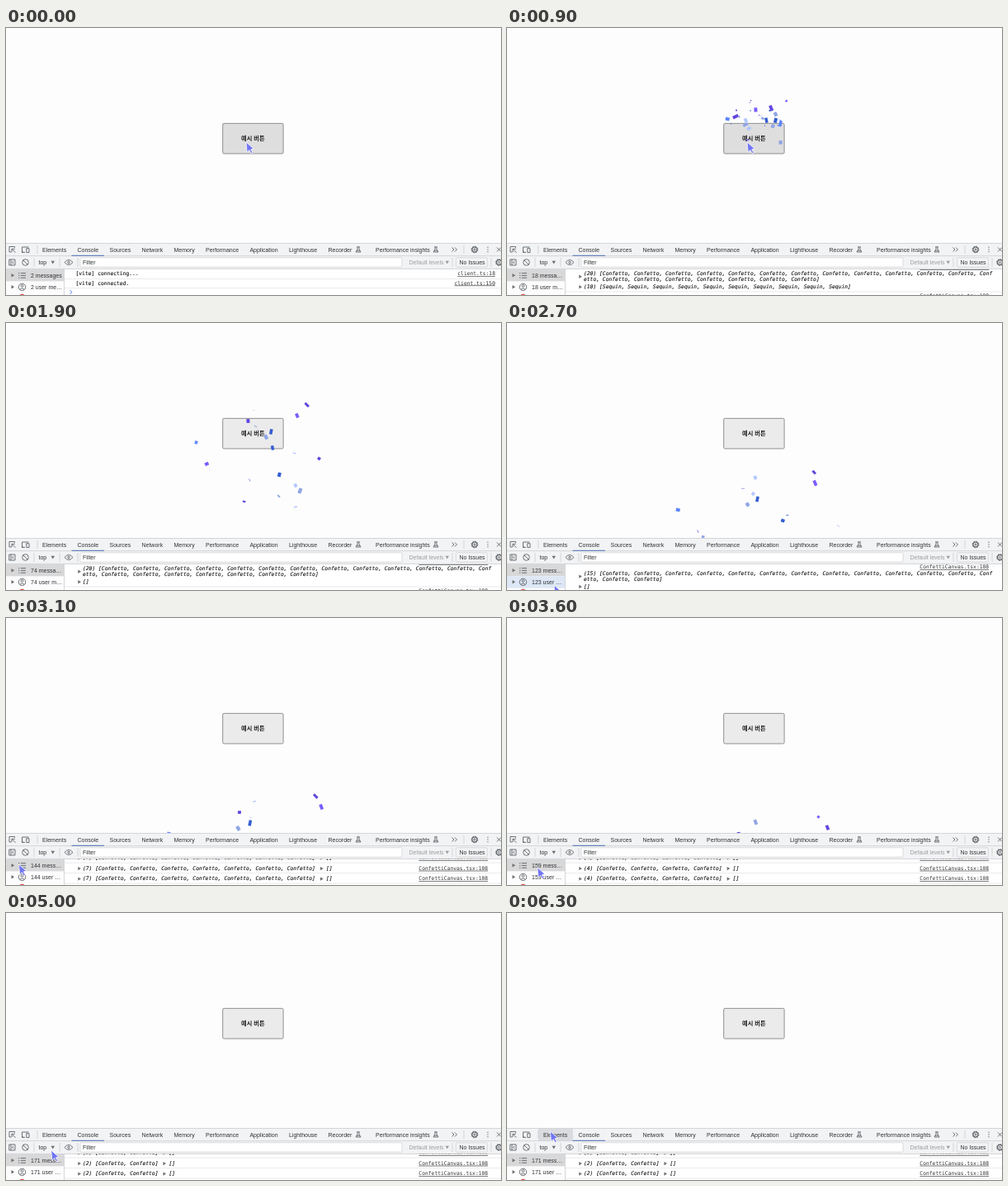
An HTML page with a canvas that plays this animation: 600 by 323 pixels, repeating every 6.4 s.

```html
<!DOCTYPE html>
<html lang="ko">
<head>
<meta charset="utf-8">
<title>Confetti button</title>
<style>
html, body { margin: 0; width: 100%; height: 100%; overflow: hidden; background: #fdfdfd; }
#stage { position: relative; width: 600px; height: 323px; overflow: hidden; }
#stage > * { position: absolute; left: 0; top: 0; display: block; }
text { font: 7px "Liberation Sans", Arial, sans-serif; fill: #303336; white-space: pre; }
.log { font: 6.33px "DejaVu Sans Mono", monospace; fill: #151515; stroke: #151515; stroke-width: .12; }
.list { font-style: italic; }
.link { text-decoration: underline; fill: #333; stroke: none; }
.label { font: 700 7.2px "Noto Sans CJK KR", "Noto Sans CJK", sans-serif; fill: #222; text-anchor: middle; }
.pale, .pale + .tri { fill: #9a9da1; }
.ico { fill: none; stroke: #5f6368; stroke-width: .9; }
.sep { stroke: #cbcdd1; stroke-width: .8; }
.row { stroke: #e4e5e7; }
.tri { fill: #6e6e6e; }
</style>
</head>
<body>
<div id="stage">
  <svg width="600" height="323">
    <rect id="button" x="262.7" y="115.4" width="73.4" height="36.6" rx="1.5" stroke="#777" stroke-width=".8"/>
    <text class="label" x="299.3" y="135.6">예시 버튼</text>
  </svg>
  <canvas id="sky" width="600" height="260"></canvas>
  <svg width="600" height="323">
    <defs>
      <clipPath id="body"><rect x="71" y="291.6" width="529" height="32"/></clipPath>
      <path id="flask" class="ico" d="M-1.8-3.2H1.8M-1-3V-.5L-3 3H3L1-.5V-3M-2 1.2H2"/>
      <g id="gear" class="ico"><circle r="3.1" stroke-width="1.3"/><circle r="1.1"/><circle r="3.9" stroke-dasharray="1.5 1.56"/></g>
    </defs>
    <rect y="260.5" width="600" height="63" fill="#f2f3f4"/>
    <rect x="71" y="291.5" width="529" height="32" fill="#fff"/>
    <rect y="291.5" width="70.5" height="32" fill="#fcfcfd"/>
    <rect id="tabHover" x="38" y="261" width="42" height="14.5" fill="#d9dbdf"/>
    <g id="chrome"></g>
    <rect y="292" width="70" height="14.3" fill="#d8d8d9"/>
    <rect id="rowHover" y="306.3" width="70" height="14.3" fill="#dde7f5"/>
    <g id="side"></g>
    <g id="console" clip-path="url(#body)"></g>
    <path id="cursor" d="M0 0L1.2 12.4L3.8 9.8L6.1 13.8L8 12.7L5.8 8.9L9.2 8.1Z" fill="#7175f3" stroke="#fff" stroke-width=".8" stroke-linejoin="round"/>
  </svg>
</div>
<script>
const LOOP = 6400, STEP = 100, BURST = 500, CLEARED = 4000;
const $ = id => document.getElementById(id);
const ctx = $('sky').getContext('2d');

const text = (x, y, s, cls = '') => `<text x="${x}" y="${y}" class="${cls}">${s}</text>`;
const line = (x1, y1, x2, y2, cls = '') => `<path class="sep ${cls}" d="M${x1} ${y1}L${x2} ${y2}"/>`;
const rowLine = y => line(71, y, 600, y, 'row');
const icon = d => `<path class="ico" d="${d}"/>`;
const ring = (x, y, r) => `<circle class="ico" cx="${x}" cy="${y}" r="${r}"/>`;
const right = (x, y) => `<path class="tri" d="M${x} ${y - 2.2}l3.6 2.2l-3.6 2.2z"/>`;
const down = x => `<path class="tri" d="M${x} 281.8h4.5l-2.25 3.8z"/>`;
const use = (id, x, y) => `<use href="#${id}" x="${x}" y="${y}"/>`;
const field = (x, w, fill) => `<rect x="${x}" y="277.8" width="${w}" height="11.4" rx="1" fill="${fill}" stroke="#d3d5d8" stroke-width=".8"/>`;

// Linear value of one column between rows of [position, value, ...]
function along(stops, p, col = 1) {
  const i = stops.findIndex(s => p < s[0]);
  if (i < 1) return stops.at(i)[col];
  const a = stops[i - 1], b = stops[i];
  return a[col] + (b[col] - a[col]) * (p - a[0]) / (b[0] - a[0]);
}

function drawChrome() {
  const gap = s => s === 'Performance insights' ? 28.7 : 13.3;
  const tabs = 'Elements,Console,Sources,Network,Memory,Performance,Application,Lighthouse,Recorder,Performance insights'
    .split(',').map((s, i) => `<tspan dx="${i && gap(s)}">${s}</tspan>`).join('');
  $('chrome').innerHTML =
    [260.5, 275.7, 291.4].map(y => line(0, y, 600, y)).join('') + line(70.5, 291, 70.5, 323) +
    [38, 555].map(x => line(x, 263, x, 273)).join('') +
    [34, 65, 87, 541, 588].map(x => line(x, 278, x, 289)).join('') +
    text(44, 270.6, tabs) + '<path d="M79.5 275.3H119" stroke="#4b6fb5"/>' +
    icon('M10.5 266V264.5H4V271H6.5M7 267.3L11.5 271.8M7 271V267.3H10.8') +
    icon('M21 271H19.5V265H27.5M19 271.4H23M24.8 266.7H28V271.6H24.8Z') +
    use('flask', 427, 268) + use('flask', 521, 268) + use('gear', 568, 268) + use('gear', 597.5, 283.5) +
    icon('M540.5 265.5l2.5 2.5l-2.5 2.5m3.5-5l2.5 2.5l-2.5 2.5') +
    icon('M584 264.6v1.4m0 1.3v1.4m0 1.3v1.4') + icon('M595 265.5l5 5m0-5l-5 5') +
    icon('M3.8 280H11V287H3.8ZM6 280V287M9.3 282L7.5 283.5L9.3 285') +
    ring(23.5, 283.5, 3.8) + icon('M20.8 280.8l5.4 5.4') +
    text(39.5, 286, 'top') + down(54.5) +
    icon('M71 283.5Q76 277.5 81 283.5Q76 289.5 71 283.5Z') + ring(76, 283.5, 1.2) +
    field(90, 390, '#fff') + text(93, 286, 'Filter') +
    text(488.5, 286, 'Default levels', 'pale') + down(532.5) +
    field(545.4, 38, '#f2f3f4') + text(549.5, 286, 'No Issues');
}

function sideHTML(n) {
  const cut = String(n).length - 1;
  const all = ['messages', 'messa…', 'mess…'][cut], user = ['user me…', 'user m…', 'user …'][cut];
  return right(6.5, 299.2) + right(6.5, 313.3) +
    [296.6, 299.4, 302.2].map(y => icon(`M15 ${y}h1.4m1.4 0H24`)).join('') +
    ring(19.5, 313.4, 4.2) + ring(19.5, 312, 1.4) + icon('M16.7 316.4Q19.5 313.4 22.3 316.4') +
    '<circle cx="19.5" cy="326.2" r="4.4" fill="#e05244"/>' +
    text(30, 302, `${n} ${all}`) + text(30, 316, `${n} ${user}`);
}

const CHAR = 3.811, COLS = 130, LEFT = 93;
const list = (n, name) => n ? `(${n}) [${Array(n).fill(name).join(', ')}]` : '[]';
const link = (end, y, s) => text(end - s.length * CHAR, y, s, 'log link');
const source = y => link(584.2, y, 'ConfettiCanvas.tsx:108');

function consoleHTML(t, confetti, sequins) {
  if (t <= BURST) {
    const row = (y, s, from) => text(84.5, y, s, 'log') + link(593, y, from) + rowLine(y + 4.2);
    return row(299.4, '[vite] connecting...', 'client.ts:18') + row(310.5, '[vite] connected.', 'client.ts:150') +
      '<path d="M77.5 317.5l2.6 2.1l-2.6 2.1" fill="none" stroke="#5b7fe0"/>';
  }
  const words = list(confetti, 'Confetto');
  if (confetti >= 10) {
    const y = t < 2600 ? 299 : 304.8;
    return source(y - 7.7) + right(87.3, y + 1.8) +
      text(LEFT, y, words.slice(0, COLS), 'log list') + text(LEFT, y + 7.2, words.slice(COLS), 'log list') +
      right(87.3, y + 14.2) + text(LEFT, y + 16, list(sequins, 'Sequin'), 'log list') +
      rowLine(y + 20) + source(y + 27);
  }
  const end = LEFT + words.length * CHAR;
  return [0, 1, 2].map(i => 292.2 + i * 12.5).map(y =>
    right(87.3, y - 1.6) + text(LEFT, y, words, 'log list') + right(end + 6, y - 1.6) +
    text(end + 13, y, '[]', 'log list') + source(y) + rowLine(y + 3.9)).join('');
}

// Each confetto is thrown up, slowed by drag, then sinks at a limited speed while it flips
const GRAVITY = .66, SINK = 3.33, SPREAD = 32;
const colors = [['#7b5cff', '#6245e0'], ['#b3c7ff', '#8fa5e5'], ['#5c86ff', '#345dd1']];
let seed = 11;
const rand = (a, b) => a + (b - a) * ((seed = seed * 48271 % 2147483647) / 2147483647);
const pick = a => a[Math.floor(rand(0, a.length))];

const confetti = Array.from({ length: 20 }, (_, i) => {
  const y = rand(122, 150), rest = 99 + 6.5 * i;
  const v = SINK - Math.sqrt(2 * GRAVITY * (SINK * SPREAD - (rest - y)));
  return {
    y, v, rise: (SINK - v) / GRAVITY, x: rand(272, 326), push: rand(-50, 50) + rand(-35, 35), drift: rand(-1, 1),
    w: rand(2.8, 4.4), h: rand(4.5, 7.5), turn: rand(0, 2 * Math.PI), phase: rand(0, 2 * Math.PI), paint: pick(colors)
  };
});
const sequins = Array.from({ length: 10 }, () => (
  { x: rand(272, 326), y: rand(122, 150), vx: rand(-3, 3), vy: rand(-14, -8), r: rand(.6, 1.2), paint: pick(colors) }));

function drawSky(n) {
  for (const p of confetti) {
    const a = Math.min(n, p.rise);
    const y = p.y + p.v * a + GRAVITY * a * a / 2 + SINK * (n - a);
    const flip = Math.cos(y * .164 + p.phase);
    ctx.save();
    ctx.translate(p.x + p.push * (1 - Math.exp(-.15 * n)) + p.drift * n, y);
    ctx.rotate(p.turn);
    ctx.scale(1, flip);
    ctx.fillStyle = p.paint[flip > 0 ? 0 : 1];
    ctx.fillRect(-p.w / 2, -p.h / 2, p.w, p.h);
    ctx.restore();
  }
  for (const s of sequins) {
    ctx.fillStyle = s.paint[1];
    ctx.beginPath();
    ctx.arc(s.x + s.vx * n, s.y + s.vy * n + .6 * n * n, s.r, 0, 7);
    ctx.fill();
  }
}

// time, ticks of the burst, messages, confetti left
const progress = [[BURST, 0, 2, 20], [900, 4, 18, 20], [1900, SPREAD, 74, 20], [2700, 56.5, 123, 15],
  [3100, 67, 144, 7], [CLEARED, 80.5, 171, 2]];
// time, x, y
const pointer = [[1200, 291, 138], [1800, 80, 324], [2500, 58, 324], [2700, 57, 317], [3100, 15.5, 298],
  [4100, 58, 305.5], [4700, 57, 310], [5300, 52.3, 264]];

function put(id, html) {
  const el = $(id);
  if (el.last !== html) el.innerHTML = el.last = html;
}

function frame(now) {
  const t = Math.floor(now % LOOP / STEP) * STEP;
  const [ticks, messages, left] = [1, 2, 3].map(col => along(progress, t, col));
  const [x, y] = [1, 2].map(col => along(pointer, t, col));
  const dots = Math.round(along([[1400, 10], [1800, 0]], t));
  ctx.clearRect(0, 0, 600, 260);
  if (t >= BURST && t < CLEARED) drawSky(ticks);
  put('side', sideHTML(Math.round(messages)));
  put('console', consoleHTML(t, Math.round(left), dots));
  $('button').setAttribute('fill', x > 262 && y < 152 ? '#dedede' : '#ebebeb');
  $('cursor').setAttribute('transform', `translate(${x} ${y})`);
  $('rowHover').style.opacity = +(x < 70 && y > 307);
  $('tabHover').style.opacity = +(x > 38 && x < 80 && y < 275);
  requestAnimationFrame(() => frame(performance.now() - start));
}

drawChrome();
const start = performance.now();
frame(0);
</script>
</body>
</html>
```
